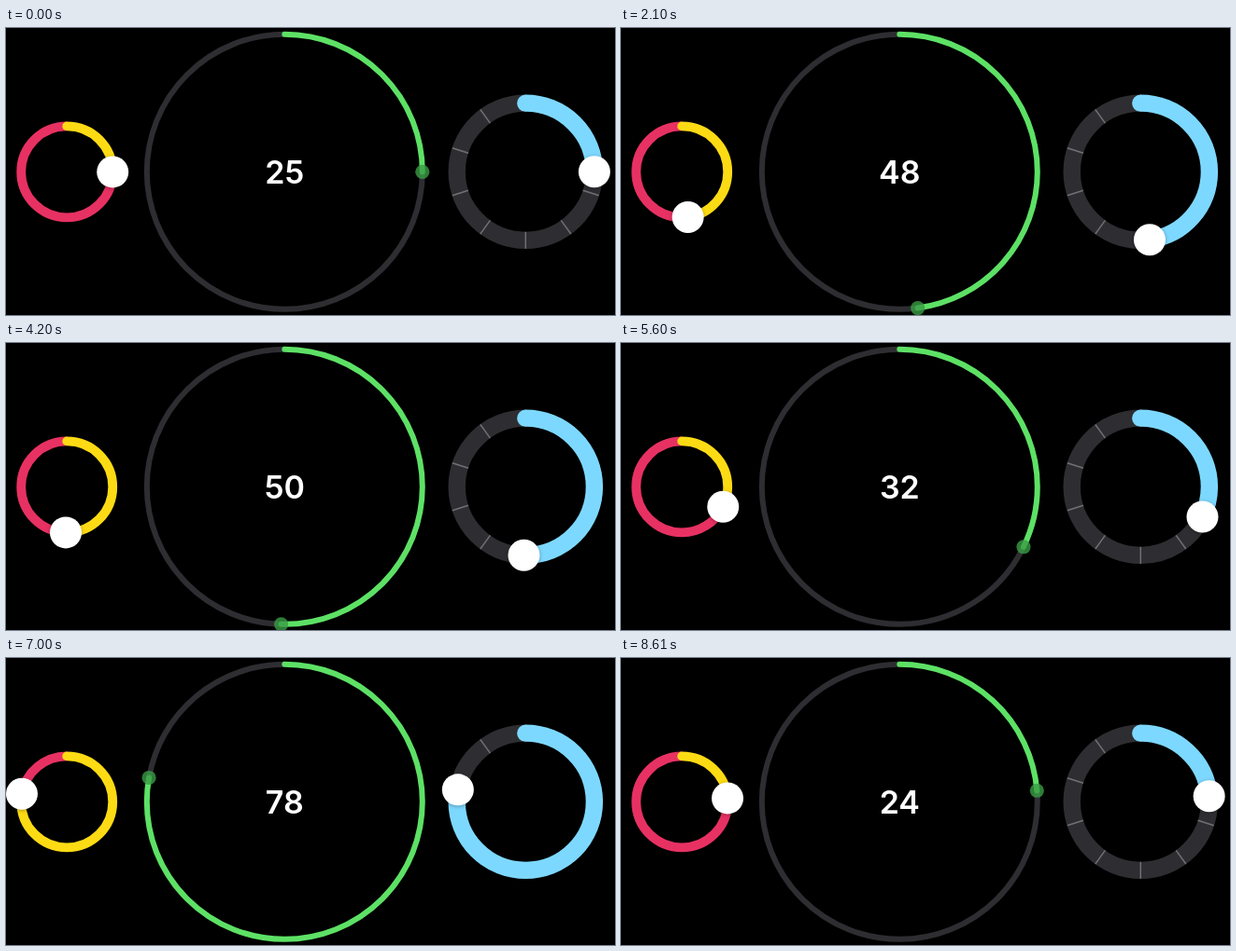
Recreate the animation shown at these times as an HTML page. Size 652 px wide and 308 px high, loop 8750 ms.

```html
<!DOCTYPE html>
<html lang="en">
<head>
<meta charset="utf-8">
<title>Circular sliders</title>
<style>
  html, body { margin: 0; width: 100%; height: 100%; overflow: hidden; background: #000; }
  svg { display: block; width: 100vw; height: 100vh; }
  circle { fill: none; }
  .fill { stroke-linecap: round; }
  .knob { fill: #fff; filter: drop-shadow(0 1px 2px rgba(0, 0, 0, .3)); }
  .dot { fill: #3a9c45; fill-opacity: .8; }
  .small { stroke-width: 9.8; }
  .large { stroke-width: 6; }
  .medium { stroke-width: 18.4; }
  text { font: 600 34px Inter, Roboto, sans-serif; fill: #fff; text-anchor: middle; }
</style>
</head>
<body>
<svg viewBox="0 0 652 308">
  <g class="small" transform="translate(65.2 154.4)">
    <circle class="track" r="49" stroke="#e83163" pathLength="100" transform="rotate(-90)"/>
    <circle class="fill" r="49" stroke="#fddb14" pathLength="100" transform="rotate(-90)"/>
    <circle class="knob" r="17" data-orbit="49"/>
  </g>
  <g class="large" transform="translate(298.3 154.3)">
    <circle class="track" r="147.5" stroke="#2e2e32" pathLength="100" transform="rotate(-90)"/>
    <circle class="fill" r="147.5" stroke="#5de165" pathLength="100" transform="rotate(-90)"/>
    <circle class="dot" r="7.6" data-orbit="147.5"/>
    <text y="12.2"></text>
  </g>
  <g class="medium" transform="translate(556.3 154.25)">
    <circle class="track" r="73.6" stroke="#2e2e32" pathLength="100" transform="rotate(-90)"/>
    <g id="ticks" stroke="#707075" stroke-width="1.5"></g>
    <circle class="fill" r="73.6" stroke="#7dd8ff" pathLength="100" transform="rotate(-90)"/>
    <circle class="knob" r="17" data-orbit="73.6"/>
  </g>
</svg>
<script>
  const LOOP = 8750, STEP = 70, LAST = 8610;

  // Turning points and changes of pace of the drag: [ms, percent]
  const drag = [
    [0, 25], [1175, 22], [2100, 47.9], [3430, 94.1], [4200, 50.4], [5180, 24],
    [5600, 32.2], [6580, 100], [6650, 100], [7000, 77.8], [8150, 23.7], [LAST, 23.7]
  ];

  const secant = i => (drag[i + 1][1] - drag[i][1]) / (drag[i + 1][0] - drag[i][0]);

  // Harmonic mean keeps the curve from overshooting its points.
  const slopes = drag.map((_, i) => {
    if (i === 0 || i === drag.length - 1) return 0;
    const a = secant(i - 1), b = secant(i);
    return a * b > 0 ? 2 * a * b / (a + b) : 0;
  });

  function valueAt(time) {
    let i = 0;
    while (i < drag.length - 2 && time >= drag[i + 1][0]) i++;
    const [t0, v0] = drag[i], [t1, v1] = drag[i + 1];
    const span = t1 - t0, u = (time - t0) / span, w = 1 - u;
    return w * w * ((1 + 2 * u) * v0 + u * span * slopes[i])
         + u * u * ((1 + 2 * w) * v1 - w * span * slopes[i + 1]);
  }

  const ticks = document.getElementById('ticks');
  for (let i = 0; i < 10; i++) {
    const line = document.createElementNS('http://www.w3.org/2000/svg', 'line');
    line.setAttribute('y1', -64.5);
    line.setAttribute('y2', -82.5);
    line.setAttribute('transform', `rotate(${i * 36})`);
    ticks.append(line);
  }

  const tracks = document.querySelectorAll('.track');
  const fills = document.querySelectorAll('.fill');
  const handles = document.querySelectorAll('[data-orbit]');
  const label = document.querySelector('text');

  function draw(now) {
    const time = Math.min(Math.floor(now % LOOP / STEP) * STEP, LAST);
    const value = valueAt(time);
    const angle = value / 50 * Math.PI;
    for (const fill of fills) fill.setAttribute('stroke-dasharray', `${value} 200`);
    // The track covers only the rest of the turn, so it cannot fringe the fill.
    for (const track of tracks) track.setAttribute('stroke-dasharray', `0 ${value} 200 0`);
    for (const handle of handles) {
      const orbit = +handle.dataset.orbit;
      handle.setAttribute('cx', orbit * Math.sin(angle));
      handle.setAttribute('cy', -orbit * Math.cos(angle));
    }
    label.textContent = Math.round(value);
  }

  function tick() {
    draw(performance.now());
    requestAnimationFrame(tick);
  }
  tick();
</script>
</body>
</html>
```
